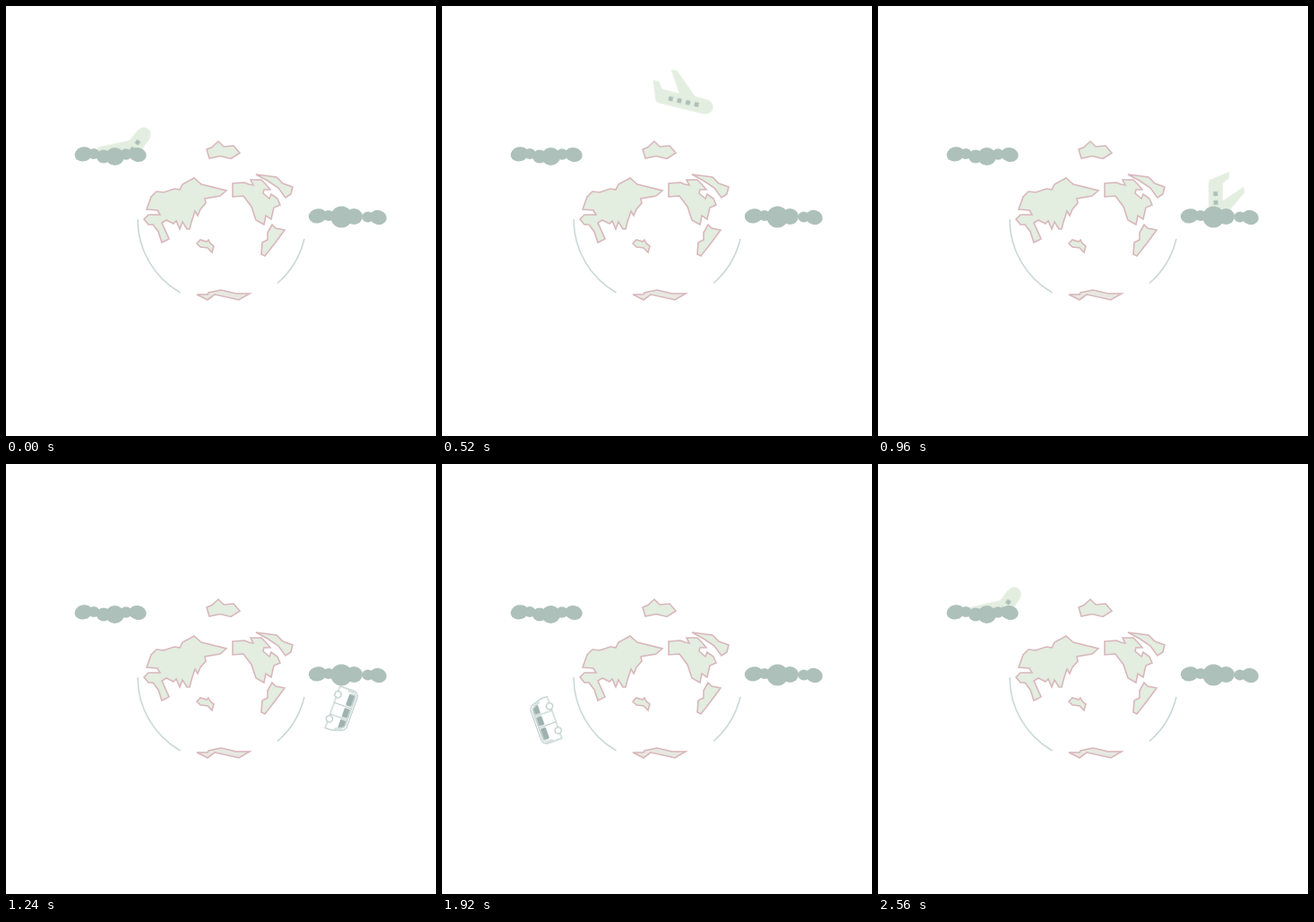
An HTML page for the animation above (2.6 s loop, 480 by 480 pixels).

```html
<!DOCTYPE html>
<html lang="en">
<head>
<meta charset="utf-8">
<title>Round the globe</title>
<style>
  html, body { margin: 0; width: 100%; height: 100%; overflow: hidden; background: #fff; }
  svg { display: block; width: 100vw; height: 100vh; }

  .land { fill: #e3ede0; stroke: #d8b7bb; stroke-width: 1.6; stroke-linejoin: miter; }
  .ice { fill: #e7e8e2; }
  .rim { fill: none; stroke: #cbd8d9; stroke-width: 1.6; }
  .cloud { fill: #adc0ba; }

  .plane { fill: #e3eee0; }
  .plane rect { fill: #abbfb8; }
  .bus { fill: #fff; stroke: #b3c7c4; stroke-width: 1.2; stroke-linejoin: round; }
  .bus .glass { fill: #9fb3ae; stroke: none; }

  .plane, .bus { transform-origin: 0 0; }
  .plane { animation: fly 2600ms -100ms infinite, planeShow 2600ms linear infinite; }
  .bus { animation: drive 2600ms -1590ms infinite, busShow 2600ms linear infinite; }

  @keyframes fly {
    0% { transform: rotate(-31.8deg); animation-timing-function: ease-in-out; }
    51.92%, 75% { transform: rotate(127.2deg); animation-timing-function: step-end; }
    75.01%, 100% { transform: rotate(-31.8deg); }
  }
  @keyframes drive {
    0% { transform: rotate(95deg); animation-timing-function: ease-in-out; }
    52.69%, 75% { transform: rotate(294deg); animation-timing-function: step-end; }
    75.01%, 100% { transform: rotate(95deg); }
  }
  @keyframes planeShow {
    0%, 43.85% { opacity: 1; }
    47.3%, 88.46% { opacity: 0; }
    98.46%, 100% { opacity: 1; }
  }
  @keyframes busShow {
    0%, 41.5% { opacity: 0; }
    43%, 87% { opacity: 1; }
    94%, 100% { opacity: 0; }
  }
</style>
</head>
<body>
<svg viewBox="0 0 480 480">
  <defs>
    <clipPath id="sky"><path d="M0 0H480V236H300L200 168H0Z"/></clipPath>
  </defs>

  <!-- globe -->
  <path class="rim" d="M147 238A94.5 94.5 0 0 0 194.500 320M333 260A94.500 94.500 0 0 1 303 309.500"/>
  <g class="land">
    <path d="M224 160L230 157.500 237 151 243 157 254 156 261 164 251 170.500 239 167.500 227 170Z"/>
    <path d="M157 227L162 213 168 207 176 208 188 204 194 205 197 199 210 192 218 199 246 206 239 212 222 215 223 220 217 227 214 234 211 229 207 241 205 249 202 249 197 241 194 249 190 240 187 243 179 239 174 242 182 260 174 264 170 252 164 244 159 244 154 238 159 233 172 233 169 228Z"/>
    <path d="M253 198L266 197 271 199 276 200 273 194 285 194 290 199 295 205 288 205 287 209 294 215 296 210 303 215 306 222 299 225 296 238 290 234 288 244 279 239 274 224 265 212 253 213Z"/>
    <path d="M279 188L302 191 309 198 320 202 318 210 312 214 304 203 292 195Z"/>
    <path d="M297 244L301 248 311 250 300 265 289 279 285 277 286 264 292 261 292 253Z"/>
    <path d="M213 265L217 261 224 263 226 261 228 265 232 268 230 275 225 270 217 269Z"/>
    <path class="ice" d="M213 322L225 322 226 320 240 317 257 321 272 321 260 328 233 322 225 328Z"/>
  </g>

  <!-- plane -->
  <g clip-path="url(#sky)">
    <g transform="translate(247.500 235)">
      <g class="plane">
        <g transform="translate(-247.500 -235)">
          <path d="M195 106.500L208 101.500C215 99.500 220 103 220 108.500C220 113 217 115.500 213 117.500L169 136 163.500 137.500 146.500 120 153 117.500 161 122 179 114.500 156 99 161.500 95.500Z"/>
          <g transform="translate(175 125) rotate(-24)">
            <rect x="-2.400" y="-2.400" width="4.800" height="4.800"/>
            <rect x="7.500" y="-2.400" width="4.800" height="4.800"/>
            <rect x="17.300" y="-2.400" width="4.800" height="4.800"/>
            <rect x="27.100" y="-2.400" width="4.800" height="4.800"/>
          </g>
        </g>
      </g>
    </g>
  </g>

  <!-- bus -->
  <g transform="translate(243 234.700)">
    <g class="bus">
      <g transform="translate(0 -129) rotate(3)">
        <path d="M-24 2V-13Q-24 -20.500 -17 -20.500H16Q20 -20.500 22 -16L25.500 -5V2Z"/>
        <path d="M-22 -8V-13Q-22 -18.300 -17 -18.300H15Q18.500 -18.300 20 -15L22.500 -8M-4.500 -18V2M9 -18V2" fill="none" stroke-width="1"/>
        <g class="glass">
          <rect x="-19.500" y="-17.500" width="13.500" height="6.500" rx="1.500"/>
          <rect x="-3" y="-17.500" width="10.500" height="6.500" rx="1"/>
          <path d="M10.500 -17.500H16.500Q18.500 -17 20.500 -11H10.500Z"/>
        </g>
        <circle cx="-14.400" cy="1" r="3.600"/>
        <circle cx="14.400" cy="1" r="3.600"/>
      </g>
    </g>
  </g>

  <!-- clouds -->
  <g class="cloud">
    <ellipse cx="86.500" cy="165.300" rx="10" ry="8" transform="rotate(-15 86.500 165.300)"/>
    <ellipse cx="98" cy="165" rx="6.500" ry="6"/>
    <ellipse cx="109" cy="168" rx="8" ry="7.500"/>
    <ellipse cx="121.500" cy="168" rx="10.500" ry="10"/>
    <ellipse cx="134" cy="165.500" rx="6.500" ry="6.200"/>
    <ellipse cx="147" cy="166" rx="9.800" ry="8" transform="rotate(12 147 166)"/>
    <ellipse cx="348" cy="234.300" rx="10.300" ry="8" transform="rotate(-10 348 234.300)"/>
    <ellipse cx="360" cy="234" rx="6.500" ry="6"/>
    <ellipse cx="374.500" cy="235.600" rx="12" ry="12"/>
    <ellipse cx="388.500" cy="235" rx="9.500" ry="9"/>
    <ellipse cx="404" cy="235.500" rx="6.500" ry="6"/>
    <ellipse cx="415.500" cy="236" rx="9.500" ry="8" transform="rotate(15 415.500 236)"/>
  </g>
</svg>
</body>
</html>
```
